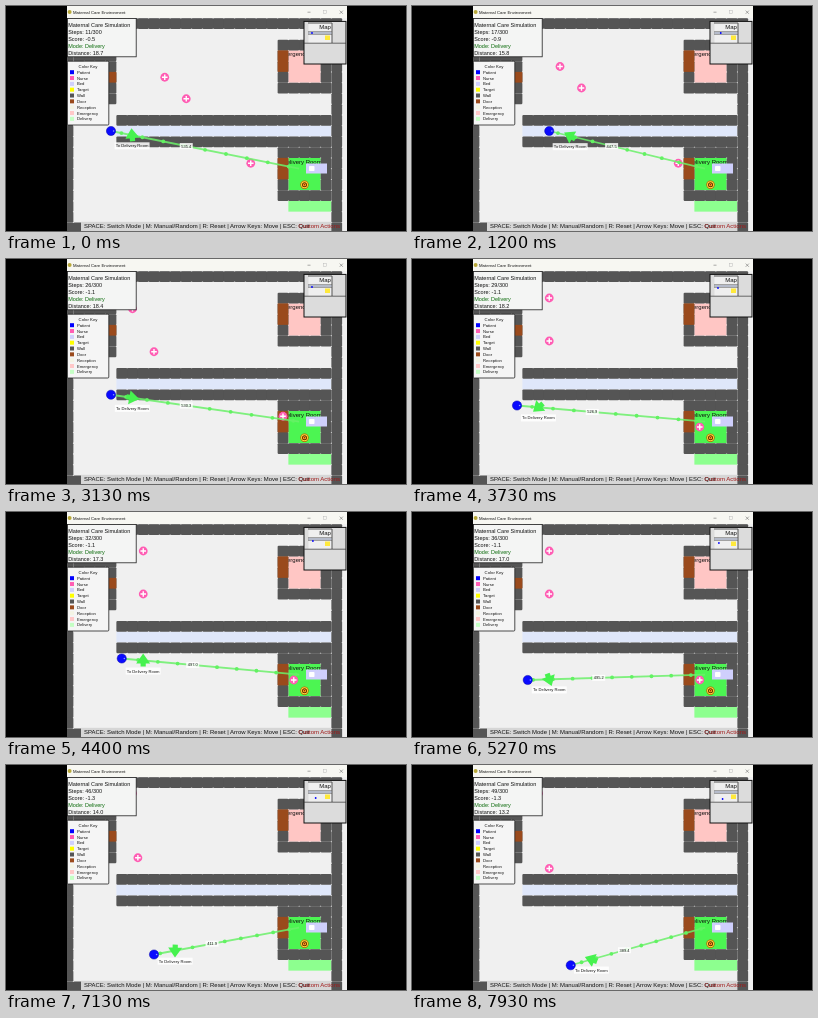
An HTML page that plays this animation: 400 by 225 pixels, repeating every 8 s.

```html
<!DOCTYPE html>
<html lang="en">
<head>
<meta charset="utf-8">
<title>Maternal Care Environment</title>
<style>
  html, body { margin: 0; width: 100%; height: 100%; overflow: hidden; background: #000; }
  svg { display: block; width: 100vw; height: 100vh; }
  text { font-family: "Liberation Sans", Arial, sans-serif; }
</style>
</head>
<body>
<svg id="stage" viewBox="0 0 400 225"></svg>
<script>
const LOOP = 8000, STEP_MS = 206, STEP_LEAD = 85, FIRST_STEP = 11;
const CELL = 10.75, X0 = 105, Y0 = 125;
const GOAL = { x: 17.5, y: 3.5 }, TARGET = { x: 18, y: 5 };
const WALL = '#555', DOOR = '#9a4a1c', PINK = '#ff5cb3', BED = '#cfcffc', LIME = '#46f24f';
const svg = document.getElementById('stage');
const px = i => X0 + i * CELL;
const py = j => Y0 + j * CELL;

function add(tag, attrs, parent = svg) {
  const el = document.createElementNS('http://www.w3.org/2000/svg', tag);
  for (const k in attrs) el.setAttribute(k, attrs[k]);
  parent.appendChild(el);
  return el;
}
function set(el, attrs) {
  for (const k in attrs) el.setAttribute(k, attrs[k]);
}
const rect = (x, y, width, height, fill, more, parent) =>
  add('rect', { x, y, width, height, fill, ...more }, parent);
const circle = (cx, cy, r, fill, more, parent) =>
  add('circle', { cx, cy, r, fill, ...more }, parent);
function text(str, x, y, size, more, parent) {
  const el = add('text', { x, y, 'font-size': size, fill: '#111', ...more }, parent);
  el.textContent = str;
  return el;
}
const mid = { 'text-anchor': 'middle' };

// Cell helpers: i0..i1 and j0..j1 are inclusive
const area = (i0, j0, i1, j1, fill, inset = 0) =>
  rect(px(i0 - .5) + inset, py(j0 - .5) + inset,
    (i1 - i0 + 1) * CELL - 2 * inset, (j1 - j0 + 1) * CELL - 2 * inset, fill, {}, world);
function walls(i0, j0, i1, j1) {
  area(i0, j0, i1, j1, WALL, .6);
  for (let i = i0; i <= i1; i++)
    for (let j = j0; j <= j1; j++)
      rect(px(i - .5), py(j - .5), CELL, CELL, WALL, { rx: 1.2 }, world);
}
function room(i0, j0, i1, j1) {
  walls(i0, j0, i1, j0);
  walls(i0, j1, i1, j1);
  walls(i0, j0 + 1, i0, j1 - 1);
  walls(i1, j0 + 1, i1, j1 - 1);
}

const clip = add('clipPath', { id: 'window' }, add('defs', {}));
rect(61, 0, 280, 225, '#fff', {}, clip);
const world = add('g', { 'clip-path': 'url(#window)' });

// Floor and rooms
rect(61, 0, 280, 225, '#f0f0f0', {}, world);
area(1, 0, 20, 0, '#dfe7fa');
area(17, -7, 19, -5, '#ffc6c4');
area(17, 3, 19, 5, '#4cf552');
area(17, 7, 20, 7, '#8dff8f');
text('Emergency Room', 296, 50.2, 6, mid, world);
text('Delivery Room', 296, 158, 6, mid, world);
room(-4, -10, 21, 9);
room(-3, -7, 0, -3);
room(16, -8, 20, -4);
room(16, 2, 20, 6);
walls(1, -1, 20, -1);
walls(1, 1, 20, 1);
area(0, -5, 0, -5, DOOR);
area(16, -7, 16, -6, DOOR);
area(16, 3, 16, 4, DOOR);

const nurses = [0, 1, 2].map(() => {
  const g = add('g', {}, world);
  circle(0, 0, 4.4, PINK, {}, g);
  add('path', { d: 'M-2.8 0H2.8M0-2.8V2.8', stroke: '#fff', 'stroke-width': 1.4 }, g);
  return g;
});

rect(300, 157.5, 21, 10, BED, {}, world);
rect(303, 160, 5.5, 5, '#fff', { rx: .8 }, world);

[[4.2, '#b85a00'], [3.4, '#ffe23c'], [2.5, '#6a2000'], [1.6, '#ffc428'], [.8, '#a01000']]
  .forEach(([r, c]) => circle(px(TARGET.x), py(TARGET.y), r, c, {}, world));

// Guide line, arrow and patient
const guide = add('line', { stroke: '#6cf06a', 'stroke-width': 1.8, 'stroke-opacity': .85 }, world);
const dots = Array.from({ length: 9 }, () => circle(0, 0, 1.9, '#62f262', {}, world));
const arrow = add('path', { d: 'M0-7L7 3H2.6V6H-2.6V3H-7Z', fill: LIME }, world);
function tag(w, h, size) {
  const g = add('g', {}, world);
  rect(-w / 2, -h / 2, w, h, '#fff', { 'fill-opacity': .85 }, g);
  return { g, label: text('', 0, size * .36, size, mid, g) };
}
const roomTag = tag(35, 7, 4.15);
const distTag = tag(13, 6, 4);
roomTag.label.textContent = 'To Delivery Room';
const patient = add('g', {}, world);
circle(0, 0, 4.6, '#0a0aff', { stroke: '#0000a8', 'stroke-width': .5 }, patient);
circle(2.6, 0, .8, '#8c9cff', {}, patient);

// Title bar
rect(61, 0, 280, 12, '#f7f7f2', {}, world);
circle(63.6, 6, 2, '#b8a83a', {}, world);
text('Maternal Care Environment', 67, 7.6, 4.3, {}, world);
add('path', {
  d: 'M301.5 6.2H304.5M333.7 4.6L336.9 7.8M336.9 4.6L333.7 7.8',
  stroke: '#555', 'stroke-width': .5, fill: 'none'
}, world);
rect(317.5, 4.7, 3, 3, 'none', { stroke: '#bbb', 'stroke-width': .5 }, world);

// Status panel
const frame = { stroke: '#222', 'stroke-width': .8 };
rect(61.4, 12.4, 68.8, 38.4, '#f4f5f4', frame, world);
const status = [0, 1, 2, 3, 4].map(k =>
  text('', 62.2, 21 + k * 7.1, 5.5, { fill: k === 3 ? '#0a6a0a' : '#111' }, world));
status[0].textContent = 'Maternal Care Simulation';
status[3].textContent = 'Mode: Delivery';

// Colour key
rect(61.4, 55.2, 41.4, 63.8, '#f5f5f5', { ...frame, rx: 1 }, world);
text('Color Key', 82, 62, 4.3, mid, world);
[['Patient', '#00f'], ['Nurse', PINK], ['Bed', BED], ['Target', '#ff0'], ['Wall', WALL], ['Door', DOOR],
 ['Reception', '#f4f4e4'], ['Emergency', '#ffc8c8'], ['Delivery', '#c4ffc4']].forEach(([name, c], k) => {
  const y = 66.2 + k * 5.83;
  rect(64, y - 2, 4, 4, c, {}, world);
  text(name, 71, y + 1.6, 4.2, {}, world);
});

// Mini map
rect(298, 15.4, 42, 42.6, '#dcdcdc', { stroke: '#111', 'stroke-width': 1 }, world);
rect(302.5, 16.5, 23.5, 20.5, '#efefef', {}, world);
add('path', { d: 'M302 17H326V37M302 26H326M302 28H326', stroke: WALL, 'stroke-width': 1, fill: 'none' }, world);
rect(302.5, 26.5, 23, 1, '#c9d6f4', {}, world);
rect(319, 29.5, 5, 4.5, '#ffe93b', {}, world);
add('path', { d: 'M298 37.2H340', stroke: '#333', 'stroke-width': .7 }, world);
text('Map', 319, 23.3, 6, mid, world);
const miniDot = circle(0, 0, .9, '#00f', {}, world);

// Help line
rect(75, 215.8, 250.4, 9.2, '#d6d6d6', {}, world);
text('SPACE: Switch Mode | M: Manual/Random | R: Reset | Arrow Keys: Move | ESC: Quit', 78, 222.4, 5.95, {}, world);
text('Custom Actions', 334, 222.4, 6, { fill: '#a01818', 'text-anchor': 'end' }, world);

// Tracks: [step, x, y] in cells
const walk = [[11, 0, 0], [13, 0, 0], [16, 3, 0], [20, 3, 0], [22, 2, 0], [23, 2, 0], [25, 0, 0], [26, 0, 1],
  [27, 0, 1], [29, 0, 2], [31, 1, 2], [33, 1, 2], [36, 1, 4], [38, 2, 5], [40, 3, 5], [42, 3, 5],
  [45, 4, 6], [48, 5, 7], [49, 5, 7]];
const marks = [11, 17, 23, 26, 32, 41, 49];
const keyed = pts => pts.map((p, k) => [marks[k], ...p]);
const rounds = [
  [[5, -5], [4, -6], [3, -7], [2, -7], [3, -8], [3, -9], [2, -9]],
  [[7, -3], [6, -4], [5, -3], [4, -3], [3, -4], [2, -4], [3, -2]],
  [[13, 3], [15, 3], [17, 3], [16, 3], [17, 4], [18, 4], [19, 3.5]]
].map(keyed);
const score = keyed([[-.5], [-.9], [-1], [-1.1], [-1.1], [-1.2], [-1.3]]);
const spin = keyed([[-5], [300], [625], [820], [1080], [1440], [1730]]);

function span(keys, s) {
  let k = 0;
  while (k < keys.length - 2 && s >= keys[k + 1][0]) k++;
  const a = keys[k], b = keys[k + 1];
  return [a, b, Math.min(1, (s - a[0]) / (b[0] - a[0]))];
}
function value(keys, s) {
  const [a, b, f] = span(keys, s);
  return a[1] + (b[1] - a[1]) * f;
}
// Position that hops from cell to cell
function hop(keys, s) {
  const [a, b, f] = span(keys, s);
  const n = Math.max(1, Math.abs(b[1] - a[1]), Math.abs(b[2] - a[2]));
  const q = Math.round(f * n) / n;
  return { x: a[1] + (b[1] - a[1]) * q, y: a[2] + (b[2] - a[2]) * q };
}
const mix = (a, b, f) => ({ x: a.x + (b.x - a.x) * f, y: a.y + (b.y - a.y) * f });
const at = p => `translate(${px(p.x)} ${py(p.y)})`;

function draw(t) {
  const step = FIRST_STEP + Math.floor((t + STEP_LEAD) / STEP_MS);
  const pos = hop(walk, step);
  const len = Math.hypot(GOAL.x - pos.x, GOAL.y - pos.y);
  const tip = mix(pos, GOAL, 2 / len);

  status[1].textContent = `Steps: ${step}/300`;
  status[2].textContent = `Score: ${value(score, step).toFixed(1)}`;
  status[4].textContent = `Distance: ${Math.hypot(TARGET.x - pos.x, TARGET.y - pos.y).toFixed(1)}`;

  nurses.forEach((g, k) => set(g, { transform: at(hop(rounds[k], step)) }));
  set(patient, { transform: at(pos) });
  set(miniDot, { cx: 306 + pos.x * .92, cy: 27 + pos.y });
  set(guide, { x1: px(pos.x), y1: py(pos.y), x2: px(GOAL.x), y2: py(GOAL.y) });
  dots.forEach((d, k) => {
    const p = mix(pos, GOAL, (k + (t / 600 + .5) % 1) / dots.length);
    set(d, { cx: px(p.x), cy: py(p.y) });
  });
  set(arrow, { transform: `${at(tip)} rotate(${value(spin, step)})` });
  set(roomTag.g, { transform: `${at(tip)} translate(0 10.6)` });
  set(distTag.g, { transform: at(mix(pos, GOAL, .4)) });
  distTag.label.textContent = (len * 30).toFixed(1);
}

// The picture advances 15 times a second
function tick(now) {
  draw(Math.floor(now % LOOP * .015 + .1) / .015);
  requestAnimationFrame(tick);
}
draw(0);
requestAnimationFrame(tick);
</script>
</body>
</html>
```
